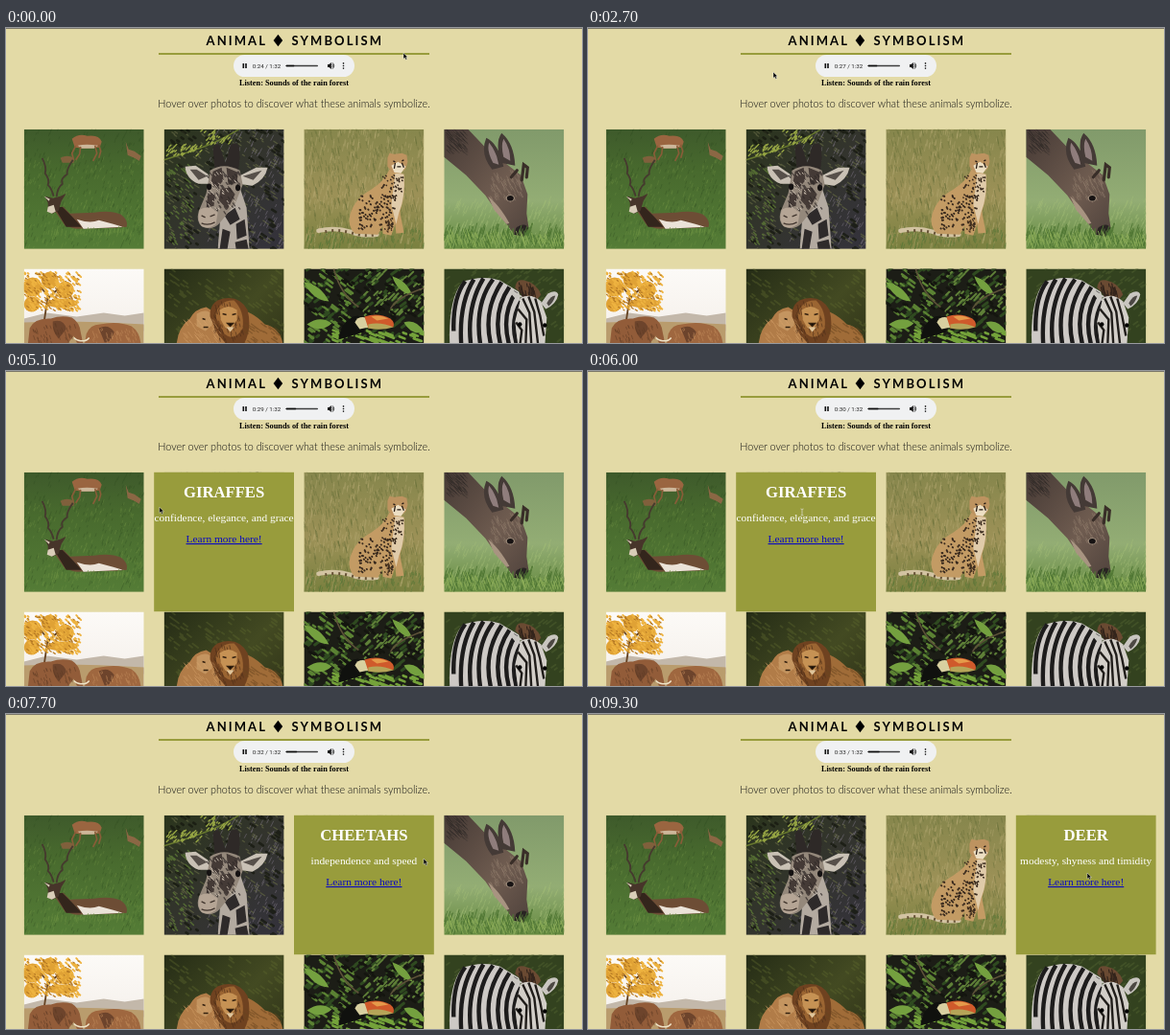
An HTML page for the animation above (9400 ms loop, 600 by 329 pixels).

```html
<!DOCTYPE html>
<html lang="en">
<head>
<meta charset="utf-8">
<title>Animal Symbolism</title>
<style>
  html, body { margin: 0; width: 100%; height: 100%; overflow: hidden; background: #e3daa6; }
  #stage { display: block; width: 600px; height: 329px; }
  text { white-space: pre; }
  .mid { text-anchor: middle; }
  .title { font: 700 13px Lato, sans-serif; letter-spacing: 2.1px; }
  .time { font: 6.2px Roboto, sans-serif; fill: #222; }
  .listen { font: bold 8.3px "Liberation Serif", serif; }
  .hint { font: 300 10.8px Lato, sans-serif; fill: #111; }
  .card { font: 11.4px "Liberation Serif", serif; fill: #fff; visibility: hidden; }
  .card.on { visibility: visible; }
  .card .name { font-weight: bold; font-size: 16.7px; }
  .card .link { fill: #0a0ac0; text-decoration: underline; }
  [data-specks] { fill: none; stroke-linecap: round; }
</style>
</head>
<body>
<svg id="stage" viewBox="0 0 600 329">
  <defs>
    <linearGradient id="meadow" x2="0" y2="1">
      <stop offset="0" stop-color="#3e5a2b"/><stop offset=".35" stop-color="#486a2e"/><stop offset="1" stop-color="#547c36"/>
    </linearGradient>
    <linearGradient id="savanna" x2="0" y2="1">
      <stop offset="0" stop-color="#86864c"/><stop offset=".55" stop-color="#9c9157"/><stop offset="1" stop-color="#79803f"/>
    </linearGradient>
    <linearGradient id="glade" x2="0" y2="1">
      <stop offset="0" stop-color="#819a6b"/><stop offset=".6" stop-color="#93ad74"/><stop offset="1" stop-color="#64893f"/>
    </linearGradient>
    <linearGradient id="thicket" x2="1" y2="1">
      <stop offset="0" stop-color="#2b351d"/><stop offset=".5" stop-color="#33342d"/><stop offset="1" stop-color="#34323c"/>
    </linearGradient>
    <linearGradient id="den" x2="1" y2="1">
      <stop offset="0" stop-color="#252c16"/><stop offset=".5" stop-color="#434a22"/><stop offset="1" stop-color="#272914"/>
    </linearGradient>
    <linearGradient id="sky" x2="0" y2="1">
      <stop offset="0" stop-color="#fcfaf7"/><stop offset="1" stop-color="#efe8e1"/>
    </linearGradient>
    <linearGradient id="hide" x2="1" y2="1">
      <stop offset="0" stop-color="#463a35"/><stop offset=".6" stop-color="#6f5c50"/><stop offset="1" stop-color="#4f423c"/>
    </linearGradient>
  </defs>

  <rect width="600" height="329" fill="#e3daa6"/>
  <rect width="600" height="1" fill="#7d796a"/>

  <text class="title" x="208.5" y="17.6">ANIMAL</text>
  <path d="M283.4 6.8L288.2 13 283.4 19.2 278.6 13Z"/>
  <text class="title" x="297.5" y="17.6">SYMBOLISM</text>
  <rect x="159" y="26" width="282" height="2" fill="#989c3c"/>

  <rect x="237" y="28" width="126" height="23" rx="11.5" fill="#f0f1f2"/>
  <path d="M246.5 37h1.6v5h-1.6zM249.2 37h1.6v5h-1.6z" fill="#111"/>
  <text class="time" id="time" x="256.7" y="41.7"></text>
  <rect x="291.5" y="38.7" width="33.5" height="1.5" rx=".7" fill="#3c3c3c"/>
  <rect id="played" x="291.5" y="38.7" height="1.5" rx=".7" fill="#0c0c0c"/>
  <path d="M335 38h1.6l2.2-2v7l-2.2-2H335z" fill="#111"/>
  <path d="M339.7 37.8q1.4 1.7 0 3.4M340 36.3q3.4 3.2 0 6.4" fill="none" stroke="#111" stroke-width=".8"/>
  <g fill="#111"><circle cx="351.5" cy="36.9" r=".8"/><circle cx="351.5" cy="39.5" r=".8"/><circle cx="351.5" cy="42.1" r=".8"/></g>

  <text class="listen mid" x="300" y="60.3">Listen: Sounds of the rain forest</text>
  <text class="hint mid" x="300" y="83">Hover over photos to discover what these animals symbolize.</text>

  <!-- antelope -->
  <svg x="18.7" y="105.8" width="125" height="125">
    <rect width="125" height="125" fill="url(#meadow)"/>
    <path data-specks="300 0 30 125 95 1 -3" stroke="#789a4a" stroke-width=".6" opacity=".45"/>
    <path data-specks="260 0 0 125 125 1 -3" stroke="#304a20" stroke-width=".7" opacity=".5"/>
    <path d="M50 10Q57 4 66 7 78 5 81 13L79 19 62 20 53 19Z" fill="#9a6540"/>
    <path d="M56 17Q65 15 77 17L73 20 60 20Z" fill="#cdb79a"/>
    <path d="M54 17L50 25 52 33M59 18L58 26 54 32M74 17L76 25 72 33M78 16L80 23 78 30" fill="none" stroke="#8a5c38" stroke-width="1.6"/>
    <path d="M38 30Q45 26 52 30L52 35 40 35Z" fill="#80603c"/>
    <path d="M106 13L109 21 115 23 122 28 120 33 115 30 108 27Z" fill="#8b6744"/>
    <path d="M31 70Q29 62 25 58 27 52 22 46 24 40 19 30M34 70Q35 61 40 57 38 51 45 47 44 42 51 32" fill="none" stroke="#453a2e" stroke-width="1.9"/>
    <path d="M30 82L41 81 48 88 73 87Q90 84 101 89 109 95 107 102L96 103 54 104 43 101Z" fill="#6d4d35"/>
    <path d="M32 82L40 81 50 91 60 102 44 102Z" fill="#33251c"/>
    <path d="M55 94Q69 99 78 95L93 99 103 102 62 104Z" fill="#ebe3d8"/>
    <path d="M22 70L30 72 38 70 44 67 39 75 36 85 30 88 25 86 25 77Z" fill="#47352a"/>
    <path d="M25 81L31 79 33 86 29 88 24 86ZM21 70L27 73 26 75Z" fill="#d9cdb8"/>
    <path data-specks="50 25 107 85 5 1 -4" stroke="#688d40" stroke-width=".7"/>
  </svg>

  <!-- giraffe -->
  <svg x="164.6" y="105.8" width="125" height="125">
    <rect width="125" height="125" fill="url(#thicket)"/>
    <path data-specks="230 0 0 125 125 3 2" stroke="#5f6340" stroke-width="1.2" opacity=".75"/>
    <path data-specks="190 45 0 80 125 2 -4" stroke="#77707c" stroke-width=".8" opacity=".7"/>
    <path data-specks="130 0 0 125 125 3 2" stroke="#16180f" stroke-width="2.6" opacity=".75"/>
    <path data-specks="70 0 35 30 85 2 2" stroke="#5d7836" stroke-width="1.4" opacity=".8"/>
    <path d="M0 32Q26 24 42 18T78 0" fill="none" stroke="#66772e" stroke-width="1.5"/>
    <path data-specks="34 2 17 38 11 2 -2" stroke="#95a443" stroke-width="1.4"/>
    <path data-specks="30 38 2 34 14 2 -2" stroke="#95a443" stroke-width="1.4"/>
    <path d="M59 88L78 58 86 82 89 125 56 125Z" fill="#b3aaa0"/>
    <path d="M63 90L74 82 79 94 69 100ZM61 104L69 107 66 125 58 125ZM75 99L84 94 86 111 76 115ZM74 118L86 115 88 125 75 125Z" fill="#2e2a2a"/>
    <path d="M46 47L33 38 22 39Q23 52 36 57L48 57ZM80 48L96 40 108 40Q105 53 92 59L78 57Z" fill="#c9c1b5"/>
    <path d="M45 49L34 42 27 42 36 53ZM82 49L95 45 102 43 93 53Z" fill="#57504a"/>
    <path d="M53 43L51 19Q54 13 58 17L64 36 69 17Q74 12 78 17L79 30 77 46Z" fill="#2e2927"/>
    <path d="M48 43Q62 34 79 43L82 58 74 78 58 98Q51 106 40 102 33 97 36 86L44 67Z" fill="#94887b"/>
    <path d="M51 44L60 40 62 53 55 62 49 55ZM65 40L77 45 76 56 67 58ZM59 62L69 61 74 68 66 84 57 74ZM46 66L53 67 52 80 44 82Z" fill="#443a36"/>
    <path data-specks="60 44 44 34 42 1.5 2" stroke="#302a29" stroke-width="1.3" opacity=".75"/>
    <path data-specks="30 46 44 30 40 1.5 2" stroke="#c4b8a9" stroke-width="1"/>
    <path d="M37 84Q47 78 56 87L54 99Q46 105 39 101 34 95 37 84Z" fill="#b5a595"/>
    <ellipse cx="47" cy="60" rx="2.6" ry="3.4" fill="#151212"/><ellipse cx="77" cy="61" rx="2.6" ry="3.4" fill="#151212"/>
    <path d="M39 90l4 2M48 91l5-2M39 98q7 3 14-1" stroke="#42362f" stroke-width="1.4" fill="none"/>
  </svg>

  <!-- cheetah -->
  <svg x="310.4" y="105.8" width="125" height="125">
    <rect width="125" height="125" fill="url(#savanna)"/>
    <path data-specks="420 0 0 125 125 1 -6" stroke="#bbae78" stroke-width=".6" opacity=".6"/>
    <path data-specks="380 0 0 125 125 -1 -5" stroke="#626a36" stroke-width=".7" opacity=".6"/>
    <path data-specks="110 0 106 125 19 1 -4" stroke="#5d7838" stroke-width="1" opacity=".75"/>
    <path d="M15 106Q32 102 49 107 61 112 76 110" fill="none" stroke="#d2c3a2" stroke-width="4.5" stroke-linecap="round"/>
    <path d="M22 107Q34 104 49 108 61 112 76 110" fill="none" stroke="#675337" stroke-width="3" stroke-dasharray="2 5"/>
    <path d="M89 42Q83 55 70 63 53 72 48 89 45 102 53 109L77 110 82 101 82 109 91 111 95 99 96 109 104 108 100 86Q106 67 104 47Z" fill="#c39b64"/>
    <path d="M95 46L104 47Q106 70 99 87L96 99 91 79Z" fill="#e0cbaa"/>
    <path data-specks="105 57 69 39 36 .3 .3" stroke="#38291d" stroke-width="1.9"/>
    <path data-specks="50 80 48 23 24 .3 .3" stroke="#38291d" stroke-width="1.6"/>
    <path data-specks="22 84 94 7 14 .3 .3" stroke="#49331f" stroke-width="1.4"/>
    <path d="M87 30L89 25 94 26 102 25 107 27 108 34 106 41 100 46 92 45 87 39Z" fill="#bd9360"/>
    <path d="M91 38L98 34 106 39 101 46 94 45Z" fill="#eddfc4"/>
    <path d="M93 33l2 1M102 33l2-1M95 35l-1 6M102 35l2 5M97 39h4" stroke="#261b14" stroke-width="1.3"/>
  </svg>

  <!-- deer -->
  <svg x="456.3" y="105.8" width="125" height="125">
    <rect width="125" height="125" fill="url(#glade)"/>
    <path data-specks="200 0 75 125 50 2 -5" stroke="#a2bb76" stroke-width=".8" opacity=".6"/>
    <path d="M0 0H25L44 20 66 37 80 48 87 68 86 88 88 102 82 112 73 110 66 100 54 85 43 69 23 48 0 29Z" fill="url(#hide)"/>
    <path data-specks="90 2 0 20 22 4 4" stroke="#2f2826" stroke-width="1" opacity=".5"/>
    <path data-specks="80 48 42 32 30 2 4" stroke="#94806f" stroke-width=".9" opacity=".5"/>
    <path d="M50 42Q37 26 44 9 57 15 62 39ZM59 35Q53 13 60 4 73 15 74 38Z" fill="#443a36"/>
    <path d="M51 35Q44 22 47 14 55 24 57 37ZM62 29Q59 17 62 10 69 20 69 33Z" fill="#8f7d7c"/>
    <path d="M70 50L76 43M81 53L83 37 87 40 86 50" fill="none" stroke="#392e28" stroke-width="3.2" stroke-linecap="round"/>
    <path d="M46 70Q58 80 68 98L65 99 52 84Z" fill="#a89481"/>
    <path d="M75 103Q85 96 88 104L83 112 73 110Z" fill="#292423"/>
    <ellipse cx="69" cy="72" rx="4.6" ry="3.6" fill="#a3917f"/><ellipse cx="69" cy="72" rx="3.5" ry="2.8" fill="#171313"/>
    <path data-specks="180 0 108 125 17 2 -7" stroke="#507734" stroke-width=".9"/>
    <path data-specks="120 0 112 125 13 -2 -6" stroke="#8bab57" stroke-width=".8"/>
  </svg>

  <!-- elephants -->
  <svg x="18.7" y="251.5" width="125" height="125">
    <rect width="125" height="125" fill="url(#sky)"/>
    <path d="M0 52L24 46 55 50 83 46 105 49 125 46V65H0Z" fill="#c3b8aa"/>
    <path d="M0 56Q45 53 125 58V80H0Z" fill="#b99c6d"/>
    <path d="M20 62L25 28 11 12M25 31L44 13" fill="none" stroke="#654322" stroke-width="1.8"/>
    <g fill="#e0a235"><circle cx="9" cy="19" r="10"/><circle cx="27" cy="12" r="9"/><circle cx="43" cy="22" r="9"/><circle cx="8" cy="37" r="8"/><ellipse cx="40" cy="36" rx="16" ry="5"/></g>
    <path data-specks="170 0 3 58 40 1.5 1.5" stroke="#eeb340" stroke-width="1.9"/>
    <path data-specks="100 0 4 58 40 1.5 1" stroke="#b67a24" stroke-width="1.2"/>
    <path d="M4 80L6 62Q11 51 28 52 39 48 50 51 58 56 59 66L62 80 55 77 52 70 44 80Z" fill="#925c39"/>
    <path d="M63 80L65 68Q69 58 79 58 98 54 112 60 121 66 122 80Z" fill="#9f673f"/>
    <path d="M30 55Q42 52 44 63L36 73Q29 65 30 55ZM78 62Q88 57 94 66 91 77 84 77Z" fill="#6d442c"/>
    <path data-specks="45 9 57 44 20 1 3" stroke="#5a3823" stroke-width="1" opacity=".5"/>
    <path data-specks="40 70 62 46 15 1 3" stroke="#bd8557" stroke-width="1" opacity=".6"/>
    <path d="M52 72q4 4 9 3M68 72q-3 4-7 3" stroke="#eee2c6" stroke-width="1.4" fill="none"/>
  </svg>

  <!-- lions -->
  <svg x="164.6" y="251.5" width="125" height="125">
    <rect width="125" height="125" fill="url(#den)"/>
    <path data-specks="110 0 0 125 70 4 3" stroke="#5e662f" stroke-width="1.8" opacity=".4"/>
    <path d="M75 40Q94 46 105 58 122 62 124 80H64Z" fill="#a06c38"/>
    <path d="M13 80Q14 62 27 52 32 42 44 40 55 45 57 60L65 80Z" fill="#b17c48"/>
    <path d="M34 47Q45 40 51 49L50 59 43 65 34 60Z" fill="#c49560"/>
    <path d="M48 50Q47 34 62 31 79 28 87 43 92 63 83 79L66 80 56 68Z" fill="#6f4220"/>
    <path d="M53 49Q58 32 73 33 84 44 82 62 73 77 63 68Z" fill="#9b6532"/>
    <path data-specks="60 52 34 30 40 1 4" stroke="#4b2d18" stroke-width="1" opacity=".6"/>
    <path data-specks="45 20 52 40 25 3 4" stroke="#d3a069" stroke-width="1" opacity=".5"/>
    <path data-specks="40 80 55 38 22 4 3" stroke="#69441f" stroke-width="1.2" opacity=".5"/>
    <path d="M58 43Q67 36 76 43L76 53 71 62 64 62 59 53Z" fill="#c69254"/>
    <path d="M61 47l4 1M71 48l4-1M66 57h6l-3 3zM40 52l3 1M41 61l5 0" stroke="#33200f" stroke-width="1.4"/>
    <path d="M65 61h8l-4 5z" fill="#e0c69c"/>
  </svg>

  <!-- toucan -->
  <svg x="310.4" y="251.5" width="125" height="125">
    <rect width="125" height="125" fill="#1c1d16"/>
    <path data-specks="100 0 0 125 78 4 -3" stroke="#2f4a20" stroke-width="3"/>
    <path data-specks="60 0 0 48 78 4 3" stroke="#5b8233" stroke-width="2.4"/>
    <path data-specks="45 65 0 60 45 -4 4" stroke="#5f8038" stroke-width="2"/>
    <path data-specks="45 30 64 92 14 5 2" stroke="#74a23a" stroke-width="2.6"/>
    <path data-specks="70 0 0 125 60 3 2" stroke="#14150f" stroke-width="2.6"/>
    <path d="M0 14Q17 16 26 34 9 33 0 14ZM92 8Q107 12 113 28 97 24 92 8ZM104 56Q117 52 125 66 112 70 104 56ZM3 58Q17 48 29 57 17 68 3 58Z" fill="#74a03f"/>
    <path d="M31 0Q38 27 57 40M125 20Q96 30 90 42" fill="none" stroke="#5c5138" stroke-width="1.6"/>
    <path d="M36 74Q37 58 51 50 62 47 68 57L62 66Z" fill="#10110e"/>
    <path d="M53 56Q56 49 65 51L68 61 58 63Z" fill="#d8d0a0"/>
    <path d="M63 50Q77 45 90 52 95 56 93 61 82 59 67 62Z" fill="#cf5a2b"/>
    <path d="M67 58Q80 55 93 61 80 65 67 62Z" fill="#b5a558"/>
    <path d="M70 50Q79 47 88 52L76 54Z" fill="#e59a4a"/>
  </svg>

  <!-- zebra -->
  <svg x="456.3" y="251.5" width="125" height="125">
    <rect width="125" height="125" fill="#33421f"/>
    <path data-specks="150 0 0 125 80 4 -3" stroke="#4c5c2d" stroke-width="1.8" opacity=".6"/>
    <path d="M6 80Q4 32 19 14 38 6 58 12L78 24 89 80Z" fill="#cdc9c5"/>
    <path d="M10 65Q9 30 22 13M18 80Q15 37 31 11M28 80Q23 40 41 10M38 80Q31 38 51 11M49 80Q40 44 60 14M59 80Q50 45 68 19M68 80Q59 48 75 24M76 80Q68 55 80 34" fill="none" stroke="#1d1c1c" stroke-width="4.4"/>
    <path d="M74 20Q75 10 83 12 96 14 101 27L93 37Z" fill="#6a4a32"/>
    <path data-specks="30 77 14 18 14 1 5" stroke="#33241b" stroke-width="1.2"/>
    <path d="M74 31L69 25 71 22 82 29ZM101 36L108 26Q117 21 119 27 117 37 106 42Z" fill="#c9c6c0"/>
    <path d="M107 36Q111 28 116 28 114 35 109 39Z" fill="#4c4843"/>
    <path d="M80 30Q91 25 101 34L107 51 105 80H77L74 55Z" fill="#d2cec8"/>
    <path d="M82 31L89 46 91 80M88 29L94 45 98 80M95 31L100 49 104 70M77 42L86 53 85 80M75 56L81 64 79 80" fill="none" stroke="#201d1a" stroke-width="2.4"/>
    <circle cx="79" cy="58" r="2.2"/><circle cx="105" cy="59" r="2.2"/>
  </svg>

  <g id="cards"></g>
  <path id="arrow" d="M0 0V6.2L1.5 4.9 2.6 7.3 3.7 6.8 2.7 4.5H4.5Z" fill="#000" stroke="#fff" stroke-width=".4"/>
  <path id="beam" d="M-1.5-3.5Q0-3.5 0-2.5V2.5Q0 3.5-1.5 3.5M1.5-3.5Q0-3.5 0-2.5M0 2.5Q0 3.5 1.5 3.5" fill="none" stroke="#d8d8c4" stroke-width=".8"/>
</svg>

<script>
  const $ = id => document.getElementById(id);
  const LOOP = 9400, STEP = 100, SIZE = 145.8, LEFT = 8.4, TOP = 105.8;

  let seed = 7;
  const rand = () => (seed = seed * 16807 % 2147483647) / 2147483647;

  for (const el of document.querySelectorAll('[data-specks]')) {
    const [n, x, y, w, h, dx, dy] = el.dataset.specks.split(' ').map(Number);
    let d = '';
    for (let i = 0; i < n; i++) {
      const px = x + rand() * w, py = y + rand() * h, k = 0.5 + rand();
      d += `M${px.toFixed(1)} ${py.toFixed(1)}l${(dx * k).toFixed(1)} ${(dy * k).toFixed(1)}`;
    }
    el.setAttribute('d', d);
  }

  $('cards').innerHTML = [
    ['ANTELOPES', 'beauty, grace, and speed'],
    ['GIRAFFES', 'confidence, elegance, and grace'],
    ['CHEETAHS', 'independence and speed'],
    ['DEER', 'modesty, shyness and timidity']
  ].map(([name, traits], i) => {
    const x = LEFT + i * SIZE, mid = x + SIZE / 2;
    return `<g class="card"><rect x="${x}" y="${TOP}" width="${SIZE}" height="145.4" fill="#989c3c"/>
      <text class="name mid" x="${mid}" y="132">${name}</text>
      <text class="mid" x="${mid}" y="157">${traits}</text>
      <text class="link mid" x="${mid}" y="179">Learn more here!</text></g>`;
  }).join('');
  const cards = [...document.querySelectorAll('.card')];

  // Pointer stops: time, x, y
  const path = [
    [0, 414, 26], [1300, 414, 26], [2500, 193, 46], [2900, 193, 46],
    [3500, 130, 111], [4200, 108, 135], [5000, 158, 142], [6000, 223, 147.5],
    [6500, 290, 150], [7300, 435, 151], [8000, 435, 151], [8300, 452, 154],
    [9300, 520, 166], [LOOP, 520, 166]
  ];

  function pointer(t) {
    const i = path.findIndex(p => p[0] > t);
    const [t0, x0, y0] = path[i - 1], [t1, x1, y1] = path[i];
    const u = (t - t0) / (t1 - t0), e = u * u * (3 - 2 * u);
    return [x0 + (x1 - x0) * e, y0 + (y1 - y0) * e];
  }

  function overText(card, x, y) {
    return [...card.querySelectorAll('text')].some(el => {
      const b = el.getBBox();
      return x > b.x && x < b.x + b.width && y > b.y && y < b.y + b.height;
    });
  }

  function draw(now) {
    const t = Math.floor(now % LOOP / STEP) * STEP;
    const [x, y] = pointer(t);
    const hit = y > TOP ? Math.floor((x - LEFT) / SIZE) : -1;
    cards.forEach((c, i) => c.classList.toggle('on', i === hit));

    const text = hit >= 0 && overText(cards[hit], x, y);
    $('arrow').setAttribute('visibility', text ? 'hidden' : 'visible');
    $('beam').setAttribute('visibility', text ? 'visible' : 'hidden');
    for (const id of ['arrow', 'beam']) $(id).setAttribute('transform', `translate(${x} ${y})`);

    const sec = 24.5 + t / 1000;
    $('time').textContent = `0:${Math.floor(sec)} / 1:32`;
    $('played').setAttribute('width', 33.5 * sec / 92);
  }

  const start = performance.now();
  (function tick() {
    draw(performance.now() - start);
    requestAnimationFrame(tick);
  })();
</script>
</body>
</html>
```
